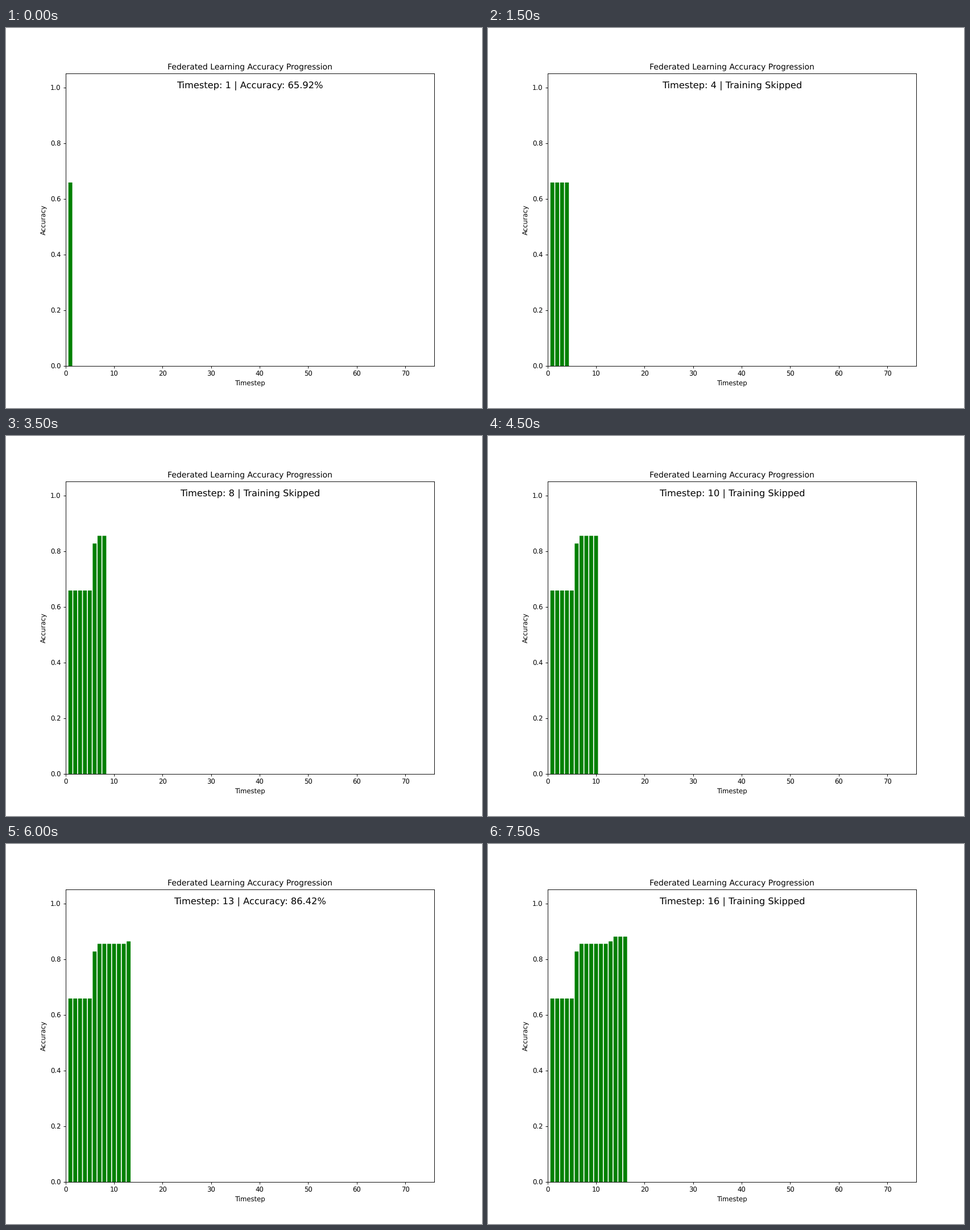
Recreate the animation shown at these times as a matplotlib script. Size 837x669 px, loop 8 s.

```python
import matplotlib.pyplot as plt
from matplotlib.animation import FuncAnimation

# Unhinted glyphs keep true proportions at this small dpi.
plt.rcParams.update({"font.family": "DejaVu Sans", "text.hinting": "no_hinting"})

STEPS = 16
# Accuracy at the steps where training ran; other steps keep the last value.
TRAINED = {1: 0.6592, 6: 0.8278, 7: 0.8555, 13: 0.8642, 14: 0.8812}


def accuracy(step):
    return TRAINED[max(s for s in TRAINED if s <= step)]


def status(step):
    if step in TRAINED:
        return f"Timestep: {step} | Accuracy: {TRAINED[step]:.2%}"
    return f"Timestep: {step} | Training Skipped"


# 837 x 669 pixels
fig, ax = plt.subplots(figsize=(10.001, 7.993), dpi=83.7)
ax.set_title("Federated Learning Accuracy Progression")
ax.set_xlabel("Timestep")
ax.set_ylabel("Accuracy")

steps = range(1, STEPS + 1)
bars = ax.bar(steps, [accuracy(s) for s in steps], width=0.8,
              color="green", snap=False)
ax.set_xlim(0, 76)
ax.set_ylim(0, 1.05)
label = ax.text(0.5, 0.95, "", transform=ax.transAxes, ha="center", fontsize=14)


def update(i):
    for k, bar in enumerate(bars):
        bar.set_visible(k <= i)
    label.set_text(status(i + 1))
    return [*bars, label]


anim = FuncAnimation(fig, update, frames=STEPS, interval=500,
                     repeat=True, repeat_delay=0, blit=False)
plt.show()
```
